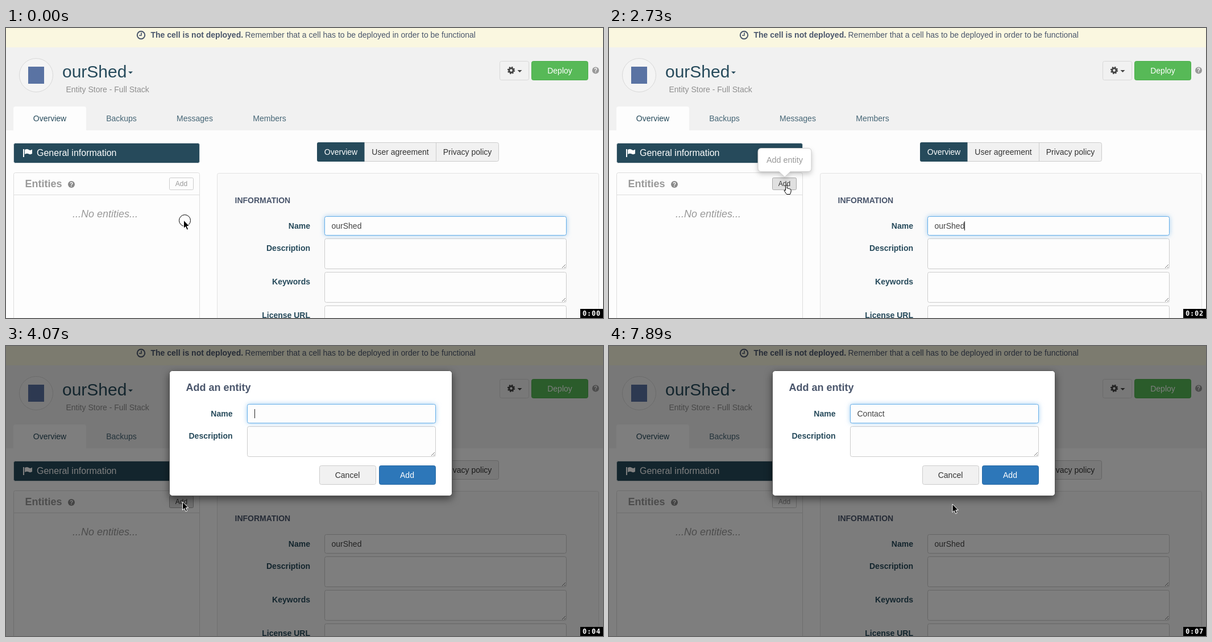
Animation, 1050 px wide and 510 px high, one loop 8 s. Source, as an HTML page:

```html
<!DOCTYPE html>
<html lang="en">
<head>
<meta charset="utf-8">
<title>Adding an entity</title>
<style>
  html, body { margin: 0; width: 100%; height: 100%; overflow: hidden; background: #fdfdfd; }
  svg { display: block; }
  text { font: 14px "Liberation Sans", Arial, sans-serif; fill: #333; white-space: pre; }
  .bold { font-weight: bold; }
  .mid { text-anchor: middle; }
  .label { font-weight: bold; text-anchor: end; fill: #264a5b; }
  .head { font-size: 18px; font-weight: bold; }
  .tab { fill: #466676; }
  .notice { fill: #4a566c; }
  .white { fill: #fff; }
  .gray { fill: #999; }
  .help { font-size: 10px; font-weight: bold; fill: #fff; text-anchor: middle; }
  .field { fill: #fdfdfd; stroke: #ccc; }
  .button { fill: #f1f1f1; stroke: #ccc; }
  .focus { fill: #fdfdfd; stroke: #66afe9; filter: drop-shadow(0 0 4px rgba(102, 175, 233, .6)); }
  #popover { filter: drop-shadow(0 4px 4px rgba(0, 0, 0, .2)); }
  #modal > .sheet { fill: #fff; stroke: #555; filter: drop-shadow(0 5px 7px rgba(0, 0, 0, .5)); }
  #clock { font: bold 12px "DejaVu Sans Mono", monospace; letter-spacing: .78px; fill: #fff; }
</style>
</head>
<body>
<svg width="1050" height="510" viewBox="0 0 1050 510">
  <defs>
    <path id="grip" d="M-8 -2L-2 -8M-4 -2L-2 -4" stroke="#777" fill="none"/>
  </defs>

  <!-- Notice and header -->
  <rect width="1050" height="510" fill="#fdfdfd"/>
  <rect width="1050" height="34" fill="#faf7e0"/>
  <rect y="34" width="1050" height="146" fill="#f1f1f1"/>
  <g fill="none" stroke="#4a566c" stroke-width="2">
    <circle cx="237.5" cy="12.5" r="6.7"/>
    <path d="M238 8V13H234" stroke-width="1.6"/>
  </g>
  <text class="notice bold" x="254.5" y="17">The cell is not deployed.</text>
  <text class="notice" x="420.5" y="17">Remember that a cell has to be deployed in order to be functional</text>

  <circle cx="53" cy="83" r="29.5" fill="#f4f4f4" stroke="#d8d8d8"/>
  <rect x="39" y="68" width="28" height="30" fill="#5a73a3"/>
  <text x="99" y="87" style="font-size:30px;fill:#264a5b">ourShed</text>
  <path d="M215 76.500h8l-4 4z" fill="#264a5b"/>
  <text x="105.500" y="113" style="fill:#8f8f8f">Entity Store - Full Stack</text>

  <rect class="button" x="868.5" y="58.5" width="51" height="33" rx="3" style="stroke:#d8d8d8"/>
  <g fill="none" stroke="#444">
    <circle cx="888.5" cy="74.500" r="3.700" stroke-width="3"/>
    <circle cx="888.5" cy="74.500" r="5.500" stroke-width="2.400" stroke-dasharray="2.2 2.12"/>
  </g>
  <path d="M899.500 74h8l-4 4z" fill="#444"/>
  <rect x="924.5" y="58.5" width="99" height="33" rx="3" fill="#57b957" stroke="#4cae4c"/>
  <text class="white mid" x="974" y="80">Deploy</text>
  <circle cx="1037" cy="74.500" r="6" fill="#999"/>
  <text class="help" x="1037" y="78">?</text>

  <path d="M13 180V142q0-4 4-4H137q4 0 4 4V180z" fill="#fdfdfd"/>
  <text class="mid" x="77" y="164" style="fill:#264a5b">Overview</text>
  <text class="mid tab" x="203" y="164">Backups</text>
  <text class="mid tab" x="332" y="164">Messages</text>
  <text class="mid tab" x="463.500" y="164">Members</text>

  <!-- Left column -->
  <rect x="13.5" y="202.5" width="327" height="35" rx="3" fill="#264a5b" stroke="#d8dde0"/>
  <path d="M31 213V227" stroke="#fff" stroke-width="2"/>
  <path d="M33 214q4-2 7 0t6-.5V221q-3 2-6 .5t-7 .5z" fill="#fff"/>
  <text class="white" x="54" y="225" style="font-size:16px">General information</text>
  <path d="M13.500 510V257.500q0-3 3-3H337.500q3 0 3 3V510M13.500 293.500H340.500" fill="none" stroke="#ddd"/>
  <text class="head gray" x="33.500" y="280">Entities</text>
  <circle cx="115" cy="275" r="6" fill="#8a8a8a"/>
  <text class="help" x="115" y="278.500">?</text>
  <rect id="add" x="287.5" y="263.5" width="42" height="21" rx="2"/>
  <text id="addText" class="mid" x="308.500" y="278" style="font-size:12px">Add</text>
  <text class="gray" x="117" y="333" style="font-size:18px;font-style:italic">...No entities...</text>

  <!-- Right column -->
  <rect class="button" x="547.5" y="201.5" width="319" height="33" rx="3"/>
  <path d="M756.500 202V235" stroke="#ccc"/>
  <path d="M630.500 201V235H550q-3 0-3-3V204q0-3 3-3z" fill="#264a5b"/>
  <text class="white mid" x="589" y="223">Overview</text>
  <text class="mid" x="693.500" y="223">User agreement</text>
  <text class="mid" x="811.500" y="223">Privacy policy</text>
  <rect x="371.5" y="255.5" width="671" height="300" rx="3" fill="#fafafa" stroke="#e2e2e2"/>
  <text class="bold notice" x="402.500" y="308">INFORMATION</text>
  <text class="label" x="535" y="353">Name</text>
  <text class="label" x="535" y="392">Description</text>
  <text class="label" x="535" y="451">Keywords</text>
  <text class="label" x="535" y="510">License URL</text>
  <rect class="field" x="560.5" y="331.5" width="425" height="33" rx="3"/>
  <rect class="field" x="560.5" y="370.5" width="425" height="53" rx="3"/>
  <rect class="field" x="560.5" y="429.5" width="425" height="53" rx="3"/>
  <rect class="field" x="560.5" y="488.5" width="425" height="33" rx="3"/>
  <use href="#grip" x="986" y="424"/>
  <use href="#grip" x="986" y="483"/>
  <rect id="pageFocus" class="focus" x="560.5" y="331.5" width="425" height="33" rx="3"/>
  <text id="pageName" x="572.500" y="353" style="fill:#444">ourShed</text>

  <!-- Dialog -->
  <g id="modal">
    <rect width="1050" height="510" opacity=".5"/>
    <rect class="sheet" x="287.5" y="43.5" width="497" height="220" rx="5"/>
    <text class="head notice" x="316.500" y="79">Add an entity</text>
    <text class="label" x="398.500" y="124">Name</text>
    <text class="label" x="398.500" y="163">Description</text>
    <rect class="field" x="424.5" y="102.5" width="331" height="33" rx="3"/>
    <rect class="field" x="424.5" y="141.5" width="331" height="53" rx="3"/>
    <use href="#grip" x="756" y="195"/>
    <rect id="modalFocus" class="focus" x="424.5" y="102.5" width="331" height="33" rx="3"/>
    <text id="modalName" x="436.500" y="124" style="fill:#444"></text>
    <rect class="button" x="551.5" y="210.5" width="99" height="33" rx="3"/>
    <text class="mid" x="600.500" y="232">Cancel</text>
    <rect x="656.5" y="210.5" width="99" height="33" rx="3" fill="#2d77b9" stroke="#2a6ba5"/>
    <text class="white mid" x="705.500" y="232">Add</text>
  </g>
  <rect id="caret" width="1" height="16" fill="#222"/>

  <g id="popover">
    <path d="M268 211.500H350q6 0 6 6V246.500q0 6-6 6H319l-10 9.500-10-9.500H268q-6 0-6-6V217.500q0-6 6-6z" fill="#fff" stroke="#ccc"/>
    <text class="mid gray" x="309" y="237" style="font-size:14.400px">Add entity</text>
  </g>

  <g id="pointer">
    <circle id="ring" cx="2" cy=".5" r="10" fill="none" stroke="#000"/>
    <path id="arrow" d="M0 0V14.500L3.300 11.500 5.600 17 8.100 16 5.800 10.500H10.200z" stroke="#fff"/>
    <path id="hand" d="M-1 1q1.300-1.500 2.600 0V6q2-1 2.400.600 2-.8 2.400.700 2-.4 2.200 1.200V12L7 16.500H1L-3.500 10q.3-2 2.500-.4z" fill="#fff" stroke="#000"/>
  </g>

  <rect x="1010" y="494" width="40" height="16"/>
  <text id="clock" x="1014" y="506">0:00</text>
</svg>
<script>
const LOOP = 8000;
const el = id => document.getElementById(id);

// Each entry changes part of the state from its time (ms) onwards.
const script = [
  [0, { x: 312.5, y: 338, ring: 1, hand: 0, add: 'idle', caret: 0, page: 1, pop: 0, modal: 0, field: 0, typed: '', sec: 0 }],
  [150, { ring: 0 }],
  [450, { caret: 1 }],
  [900, { caret: 0 }],
  [1000, { sec: 1 }],
  [1600, { y: 331, caret: 1 }],
  [1740, { y: 307 }],
  [1870, { x: 311.5, y: 276, hand: 1, add: 'hover' }],
  [2010, { sec: 2 }],
  [2140, { pop: .06 }],
  [2280, { pop: 1, caret: 0 }],
  [2730, { caret: 1 }],
  [3030, { sec: 3 }],
  [3180, { x: 310.5, y: 274, hand: 0, ring: 1, add: 'active', caret: 0, page: .5 }],
  [3330, { ring: 0, add: 'hover', page: 0, modal: 1, pop: .65 }],
  [3480, { pop: .1, field: .3 }],
  [3620, { pop: 0, field: 1, caret: 1 }],
  [4070, { sec: 4 }],
  [4220, { caret: 0 }],
  [4820, { caret: 1 }],
  [4950, { typed: 'C' }],
  [5080, { typed: 'Co', sec: 5 }],
  [5220, { typed: 'Con' }],
  [5670, { typed: 'Cont' }],
  [5970, { sec: 6 }],
  [6120, { typed: 'Conta' }],
  [6270, { typed: 'Contac' }],
  [6410, { typed: 'Contact' }],
  [6850, { caret: 0 }],
  [7150, { sec: 7 }],
  [7300, { caret: 1 }],
  [7440, { x: 345, add: 'idle' }],
  [7590, { x: 480, y: 277 }],
  [7740, { x: 580, y: 278, caret: 0 }],
  [7890, { x: 604, y: 278 }]
];

const addStyles = {
  idle: ['#fdfdfd', '#ccc', 1, '#999'],
  hover: ['#e0e0e0', '#aaa', 1, '#333'],
  active: ['#d4d4d4', '#4a90e2', 2.5, '#333']
};

function set(id, attrs) {
  for (const name in attrs) el(id).setAttribute(name, attrs[name]);
}

function draw(t) {
  const s = Object.assign({}, ...script.filter(([at]) => at <= t).map(([, change]) => change));

  const [fill, stroke, width, textColor] = addStyles[s.add];
  set('add', { fill, stroke, 'stroke-width': width });
  el('addText').style.fill = textColor;

  set('pageFocus', { opacity: s.page });
  set('modalFocus', { opacity: s.field });
  set('modal', { visibility: s.modal ? 'visible' : 'hidden' });
  set('popover', { opacity: s.pop });
  el('modalName').textContent = s.typed;

  const text = el(s.modal ? 'modalName' : 'pageName');
  const length = s.modal && !s.typed ? 0 : text.getComputedTextLength();
  set('caret', {
    x: Math.round(+text.getAttribute('x') + length),
    y: text.getAttribute('y') - 13,
    opacity: s.caret
  });

  set('pointer', { transform: `translate(${s.x} ${s.y})` });
  set('ring', { opacity: s.ring });
  set('arrow', { opacity: 1 - s.hand });
  set('hand', { opacity: s.hand });
  el('clock').textContent = `0:0${s.sec}`;
}

const start = performance.now();
function tick() {
  draw((performance.now() - start) % LOOP);
  requestAnimationFrame(tick);
}
tick();
</script>
</body>
</html>
```
